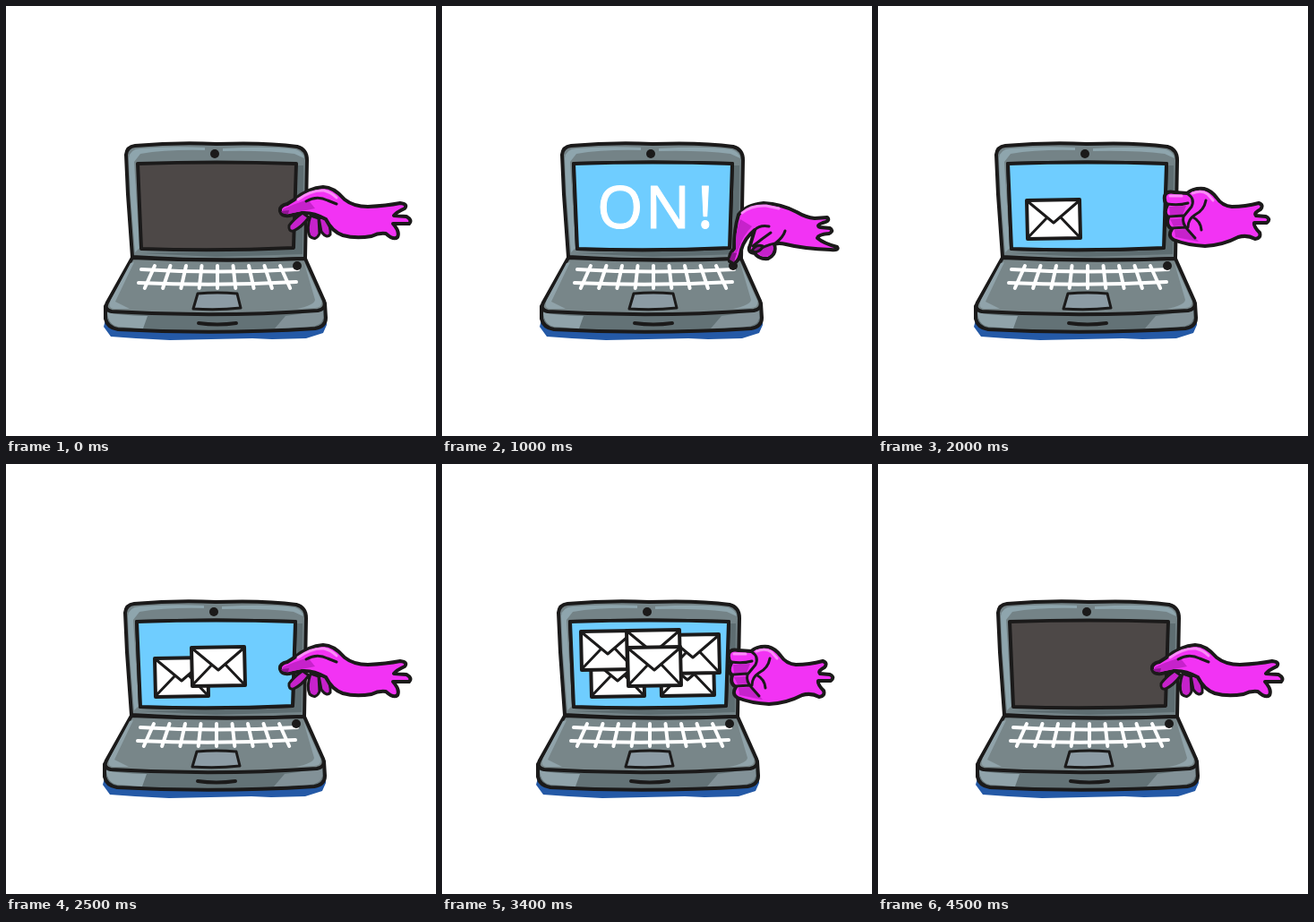
An HTML page for the animation above (5500 ms loop, 480 px wide and 480 px high).

```html
<!DOCTYPE html>
<html lang="en">
<head>
<meta charset="utf-8">
<title>Laptop and hand</title>
<style>
  html, body { margin: 0; width: 100%; height: 100%; overflow: hidden; background: #fff; }
  svg { display: block; width: 100%; height: 100%; }

  .ink { stroke: #1b1a1a; stroke-width: 4; stroke-linecap: round; stroke-linejoin: round; }
  .line { fill: none; }
  .thin { stroke-width: 3; }
  .skin { fill: #f233f4; }
  .shade { fill: #c622cb; }
  .nail { fill: #8f1592; }
  .glow { fill: none; stroke: #fb8cf8; stroke-width: 3; stroke-linecap: round; }
  .keys { fill: none; stroke: #fff; stroke-width: 4; stroke-linecap: round; }
  .word { font: 66px "Noto Sans", sans-serif; fill: #fff; stroke: #fff; stroke-linejoin: round; }

  .play { animation: 5.5s step-end infinite; }
  .laptop { animation-name: shove; }
  .lit { animation-name: power; }
  .word { animation-name: greet; }
  .inbox { animation-name: inbox; }
  .mail { opacity: 0; animation: arrive 5.5s step-end var(--at) infinite; }
  .reach { animation-name: reach; }
  .press { animation-name: press, push; }
  .fist { animation-name: fist, knock; }

  @keyframes power { 0%, 76.36% { opacity: 0 } 18.18% { opacity: 1 } }
  @keyframes greet { 0%, 32.72% { opacity: 0 } 18.18% { opacity: 1 } }
  @keyframes inbox { 0%, 76.36% { opacity: 0 } 32.72% { opacity: 1 } }
  @keyframes arrive { 0% { opacity: 1 } 70% { opacity: 0 } }

  @keyframes reach {
    0%, 27.27%, 41.81%, 80% { opacity: 1 }
    9.09%, 29.09%, 49.09% { opacity: 0 }
  }
  @keyframes press {
    0%, 27.27%, 80% { opacity: 0 }
    9.09%, 67.27% { opacity: 1 }
  }
  @keyframes fist {
    0%, 41.81%, 67.27% { opacity: 0 }
    29.09%, 49.09% { opacity: 1 }
  }

  @keyframes push {
    0%, 25.45%, 78.18% { transform: translate(1px, -4px) }
    10.9%, 67.27% { transform: translateY(-2px) }
    12.72%, 23.63%, 76.36% { transform: none }
    14.54%, 21.81%, 69.09% { transform: translate(2px, 4px) }
    16.36%, 70.9% { transform: translate(4px, 9px) }
  }
  @keyframes knock {
    0%, 32.72%, 36.36%, 40%, 54.54%, 60%, 65.45% { transform: none }
    30.9%, 34.54%, 38.18% { transform: translateX(-2px) }
    49.09%, 52.72%, 58.18% { transform: translateX(4px) }
    50.9%, 56.36%, 63.63% { transform: translateX(-3px) }
  }
  @keyframes shove {
    0%, 78.18% { transform: none }
    30.9%, 38.18%, 76.36% { transform: translateX(-1px) }
    34.54%, 67.27% { transform: translateX(-2px) }
    49.09% { transform: translateX(-3px) }
    50.9%, 56.36%, 63.63% { transform: translateX(-6px) }
    52.72%, 58.18%, 65.45% { transform: translateX(-4px) }
  }
</style>
</head>
<body>
<svg viewBox="0 0 480 480">
  <defs>
    <g id="envelope" class="ink">
      <path fill="#fff" d="M0 1L59 0 60 43 1 44Z"/>
      <path class="line thin" d="M1 43L22 21M59 42L38 20M1 2L30 26 59 1"/>
    </g>
  </defs>

  <g class="play laptop">
    <path fill="#2459a6" d="M113 343L109 358 117 369 145 371 183 373 275 371 297 372 335 371 354 365 358 356 357 340Z"/>

    <path fill="#748387" class="ink" d="M134 166Q135 157 144 156Q190 152 235 154Q290 152 325 157Q336 160 336 172L334 282Q235 286 141 280L136 210Z"/>
    <path fill="#8ea5ad" d="M137 170Q138 160 150 159Q185 156 222 158L222 161Q180 160 150 165L143 174 149 270 144 275 139 212Z"/>
    <path fill="#8ea5ad" d="M242 159Q295 156 323 160Q332 163 333 170L322 165Q290 161 242 162Z"/>
    <path fill="#5e6d71" d="M326 178L332 178 331 277 235 280 150 276 323 272Z"/>
    <path fill="#4d4847" class="ink" d="M147 176Q235 173 324 176L321 270Q235 274 151 271Z"/>
    <path class="ink play lit" fill="#6fcdff" d="M147 176Q235 173 324 176L321 270Q235 274 151 271Z"/>
    <circle cx="233" cy="165" r="5" fill="#1b1a1a"/>

    <path fill="#637276" class="ink" d="M111 335L111 349Q113 359 125 361Q235 367 345 360Q357 358 357 348L356 332Z"/>
    <path fill="#90a3aa" d="M113 342Q125 345 158 346L153 360 125 358Q114 356 113 342Z"/>
    <path fill="#829197" d="M312 346L354 340 354 349Q352 357 340 358L300 360Z"/>
    <path fill="#788689" class="ink" d="M141 281Q235 286 334 282L355 329Q358 338 348 340Q235 348 118 341Q109 339 113 331Z"/>
    <path fill="#90a3aa" d="M139 287L143 286 122 330 138 338 120 338Q113 337 117 328Z"/>
    <path fill="#90a3aa" d="M333 287L352 329Q354 336 345 337L325 338Q344 334 345 328Z"/>
    <g class="keys">
      <path d="M151 294Q235 299 326 294M148 309Q235 313 324 308"/>
      <g id="columns"></g>
    </g>
    <path fill="#8c9ba4" class="ink thin" d="M214 321Q236 319 258 321L262 337Q236 340 209 338Z"/>
    <path class="ink line" d="M215 354Q236 357 257 354"/>
    <circle cx="325" cy="290" r="5" fill="#1b1a1a"/>
  </g>

  <text class="play word" x="173 227 285" y="248">ON!</text>

  <g class="play inbox">
    <use class="mail" style="--at:1.8s" href="#envelope" x="166" y="216"/>
    <use class="mail" style="--at:2.7s" href="#envelope" x="244" y="215"/>
    <use class="mail" style="--at:2.9s" href="#envelope" x="155" y="186"/>
    <use class="mail" style="--at:3.1s" href="#envelope" x="250" y="190"/>
    <use class="mail" style="--at:3.3s" href="#envelope" x="206" y="185"/>
    <use class="mail" style="--at:2.2s" href="#envelope" x="207" y="204"/>
  </g>

  <g class="play reach">
    <path class="ink shade thin" d="M331 231Q321 238 316 245Q315 252 321 251Q330 247 338 236Z"/>
    <path class="ink shade thin" d="M340 234Q335 249 339 257Q346 263 350 254L349 237Z"/>
    <path class="ink shade thin" d="M349 236L352 252Q358 260 362 255Q363 246 357 237Z"/>
    <path class="ink skin" d="M306 229Q305 223 314 221L322 216Q338 203 354 202Q366 202 378 216Q388 224 404 224Q425 223 440 220Q449 221 445 226Q436 230 433 234L447 235Q454 239 450 243L432 243Q440 252 437 258Q433 262 424 254Q416 253 408 257Q390 260 376 256Q364 252 357 238Q343 230 330 231L316 234Q308 235 306 229Z"/>
    <path class="shade" d="M309 227L320 222 337 216 345 226 330 229 315 232Q309 232 309 227Z"/>
    <path class="nail" d="M307 229L316 228 315 232Q309 233 307 229Z"/>
    <path class="ink line thin" d="M335 218Q347 211 359 217L369 221"/>
    <path class="glow" d="M326 216Q341 205 355 206Q363 208 369 214"/>
  </g>

  <g class="play press">
    <path class="ink skin" d="M317 276Q316 268 322 262Q322 240 327 224Q335 213 355 211Q375 212 392 221Q402 227 412 228L426 227Q430 231 421 233Q413 236 418 238L429 239Q434 242 428 245Q416 246 415 250Q422 256 437 260Q440 264 430 263Q400 262 380 257Q372 255 367 257Q370 268 360 273Q350 274 345 267Q336 266 340 258L345 241Q334 250 330 263Q328 276 322 278Z"/>
    <path class="shade" d="M324 263Q323 243 329 229L342 237Q332 247 328 260L322 274 319 273Z"/>
    <path class="nail" d="M317 274L320 266 325 267 322 277Z"/>
    <path class="shade" d="M347 261L359 257 366 260Q366 270 357 271Q350 270 347 264Z"/>
    <path class="ink line thin" d="M345 241Q351 235 361 237M345 266Q356 258 368 256Q377 249 379 242M343 259Q353 251 363 244"/>
    <path class="ink nail thin" d="M342 264Q347 256 354 259Q352 265 345 266Z"/>
    <path class="glow" d="M331 222Q341 213 358 214L372 217"/>
  </g>

  <g class="play fist">
    <path class="ink skin" d="M320 212Q322 206 331 208L345 209Q352 203 364 204Q372 206 378 214Q384 223 395 224Q410 224 425 220Q431 222 427 227Q419 231 422 234L433 235Q439 238 434 242L420 242Q419 246 426 253Q428 259 421 260Q412 255 402 258Q385 267 365 268Q345 267 330 261Q323 257 328 249Q321 245 324 236Q318 232 323 222Q319 219 320 212Z"/>
    <path class="shade" d="M325 224L344 223 340 233 326 233ZM326 238L341 237 343 245 330 246ZM331 250L345 249 358 263 332 258Z"/>
    <path class="ink line thin" d="M323 221Q335 223 346 220M325 235L341 234M328 248L344 247M346 210Q354 215 350 224L341 235Q339 243 346 250L354 259M366 217Q364 228 354 233Q346 238 346 247M352 236Q360 240 361 250"/>
    <path class="glow" d="M351 209Q361 205 368 210L374 217M326 212L339 212"/>
  </g>
</svg>
<script>
  const columns = document.getElementById('columns');
  for (let k = -4; k <= 4; k++) {
    const column = document.createElementNS(columns.namespaceURI, 'path');
    column.setAttribute('d', `M${236 + k * 17.5} 290L${236 + k * 20.3} 315`);
    columns.append(column);
  }
</script>
</body>
</html>
```
